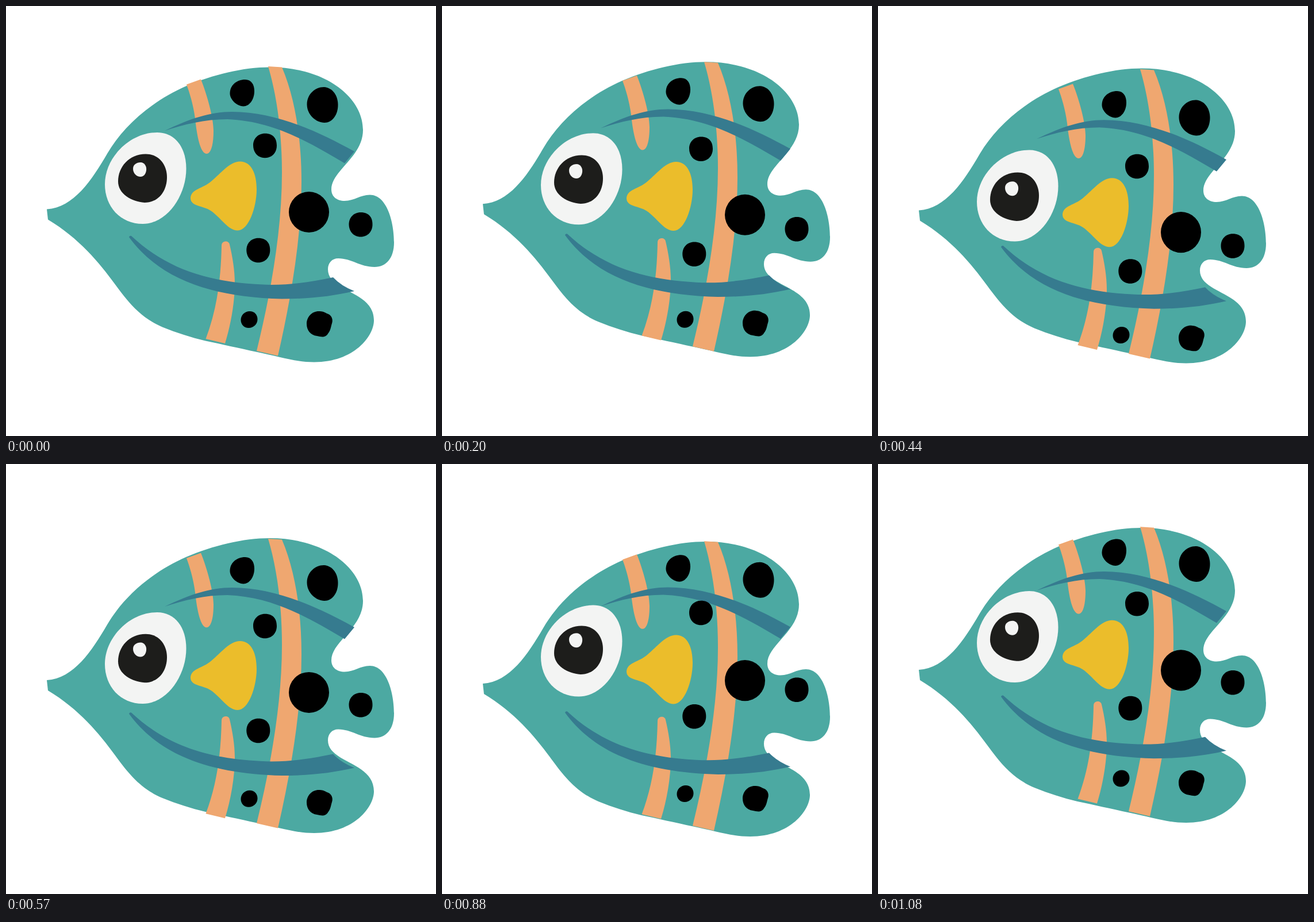
Animation, 748 px wide and 748 px high, one loop 1110 ms. Source, as an HTML page:

```html
<!DOCTYPE html>
<html lang="en">
<head>
<meta charset="utf-8">
<title>Swimming fish</title>
<style>
  html, body { margin: 0; width: 100%; height: 100%; overflow: hidden; background: #fff; }
  svg { display: block; width: 100%; height: 100%; }
</style>
</head>
<body>
<svg id="stage" viewBox="0 0 748 748"></svg>
<script>
const LOOP = 1110;
const STEPS = 33;
const STEP = LOOP / STEPS;
const TRAVEL = 39;
const STAGGER = 11.7;

const TEAL = '#4ca9a2', BLUE = '#367b8f', ORANGE = '#efa770', YELLOW = '#ebbd2b';
const WHITE = '#f3f4f3', INK = '#1d1d1b', BLACK = '#000';

const roundSpot = (x, y) =>
  `M${x} ${y}m0-21c15.5 0 20.5 10 20.5 21c0 12-8 21.5-20.5 21.5c-13 0-20.5-10-20.5-22c0-11 8-20.5 20.5-20.5z`;

// Painted back to front; each part's lag is its place in the stagger.
const parts = [
  { lag: 18, fill: TEAL, d: `M71 353.5C118 350.5 149 303 176 257C201 214 247 168.5 314 139
    C360 119.5 412 106.5 459 106.5C555 106.5 621 158.5 621 215.5C621 263 566 286 566 319
    C566 332 576 339 589 339C606 339 616 328.5 633 328.5C663 328.5 675 377 675 411
    C675 439 661 454 641 454C616 454 601 439 578 439C567 439 560 447 560 458
    C560 498 640 495 640 547C640 574 606 619.5 536 619.5C504 619.5 476 610 437 602
    C404 595 376 588.5 347 582.5C322 576.5 297 568.5 272 558.5C234 542 214 517 190 484.5
    C162 446 127 404 73 371.5Z` },
  { lag: 17, fill: ORANGE, d: `M456 105L480 106.5C503 160 514 232 514 306
    C514 405 495 512 473 608.5L436 600C460 502 480 392 480 290C480 215 470 152 456 105Z` },
  { lag: 16, fill: ORANGE, d: `M314 136.5L339 127.5C350 155 361 195 361 217
    C361 243 356 257 349 257C338 257 332 225 329 196C326 172 319 150 314 136.5Z` },
  { lag: 15, fill: ORANGE, d: `M347.5 579C368 525 374 470 375 417C375 407.5 388 407.5 389 415
    C394 436 398 460 398 482C398 515 391 555 381 587Z` },
  { lag: 14, fill: BLUE, d: `M276 217C320 196 355 184 393 184C470 184 545 219 606 253
    L589 273.5C530 239 467 200 385 197C345 197 310 206 276 217Z` },
  { lag: 13, fill: BLUE, d: `M214 402Q215 399 218 400C282 460 357 480 442 484.3
    C488 487 530 480 569 472Q583 487 606 496C567 505 528 509.5 480 509.5
    C366 506.5 271 480 214 402Z` },
  { lag: 12, fill: BLACK, d: `M416 128C427 128 432 137 432 148C432 163 423 174.5 413 174.5
    C402 174.5 389.5 163 389.5 152C389.5 138 401 128 416 128Z` },
  { lag: 11, fill: BLACK, d: `M553 141C569 142 577.5 157 577.5 172C577.5 190 567 203 554 203
    C539 203 523.5 189 523.5 171C523.5 154 537 141 553 141Z` },
  { lag: 10, fill: BLACK, d: `M546 531C552 531 556 534 561 536C567 539 569 546 567 552
    C565 558 565 564 560 570C556 577 549 576 541 574C530 573 523 564 523 553
    C523 540 533 530 546 531Z` },
  { lag: 9, fill: BLACK, d: `M424 531C432 531 437.5 537 437.5 545C437.5 553 431 560 422 560
    C414 560 408.5 554 408.5 546C408.5 538 415 531 424 531Z` },
  { lag: 8, fill: YELLOW, d: `M321 334C322 318 342 318 357 305C374 291 389 270.5 407 270.5
    C427 270.5 436 292 436 319C436 350 422 390.5 403 390.5C386 390.5 374 368 356 356
    C343 347 321 349 321 334Z` },
  { lag: 7, fill: WHITE, d: `M263 220C294 220 313.5 246 313.5 283C313.5 330 280 379 238 379
    C199 379 172 349 172 310C172 264 215 220 263 220Z` },
  { lag: 6, fill: INK, d: `M243 257.5C267 257.5 280 277 280 298C280 322 265 342 241 342
    C218 340 195 327 195 305C195 280 214 257.5 243 257.5Z` },
  { lag: 5, fill: WHITE, d: `M234 272C241 272 245 279 244 286C243 293 239 297 234 297
    C227 297 221 291 221 283C221 276 227 272 234 272Z` },
  { lag: 3, fill: BLACK, d: 'M492 358.5a35 35.5 0 1 0 70 0a35 35.5 0 1 0-70 0z' },
  { lag: 2, fill: BLACK, d: roundSpot(450.5, 242.7) },
  { lag: 1, fill: BLACK, d: roundSpot(438.8, 424.7) },
  { lag: 0, fill: BLACK, d: roundSpot(617, 380) }
];

const stage = document.getElementById('stage');
for (const part of parts) {
  part.node = document.createElementNS('http://www.w3.org/2000/svg', 'path');
  part.node.setAttribute('d', part.d);
  part.node.setAttribute('fill', part.fill);
  stage.append(part.node);
}

const ease = x => x < 0.5 ? 0.5 * (2 * x) ** 2.75 : 1 - 0.5 * (2 - 2 * x) ** 2.75;

// Down and back up once per loop.
function drop(time, lag) {
  const phase = ((time - lag * STAGGER) / LOOP + 1) % 1 * 2;
  return TRAVEL * ease(phase < 1 ? phase : 2 - phase);
}

// The motion holds on steps whose starts fall on whole hundredths of a second.
function heldTime(time) {
  let step = Math.floor((time + 5) / STEP);
  if (Math.round(step * STEP / 10) * 10 > time) step--;
  return step * STEP;
}

function render(time) {
  const held = heldTime(time % LOOP);
  for (const { node, lag } of parts) {
    const dy = drop(held, lag) - drop(0, lag);
    node.setAttribute('transform', `translate(0 ${dy.toFixed(2)})`);
  }
}

const start = performance.now();
function tick() {
  render(performance.now() - start);
  requestAnimationFrame(tick);
}
tick();
</script>
</body>
</html>
```
